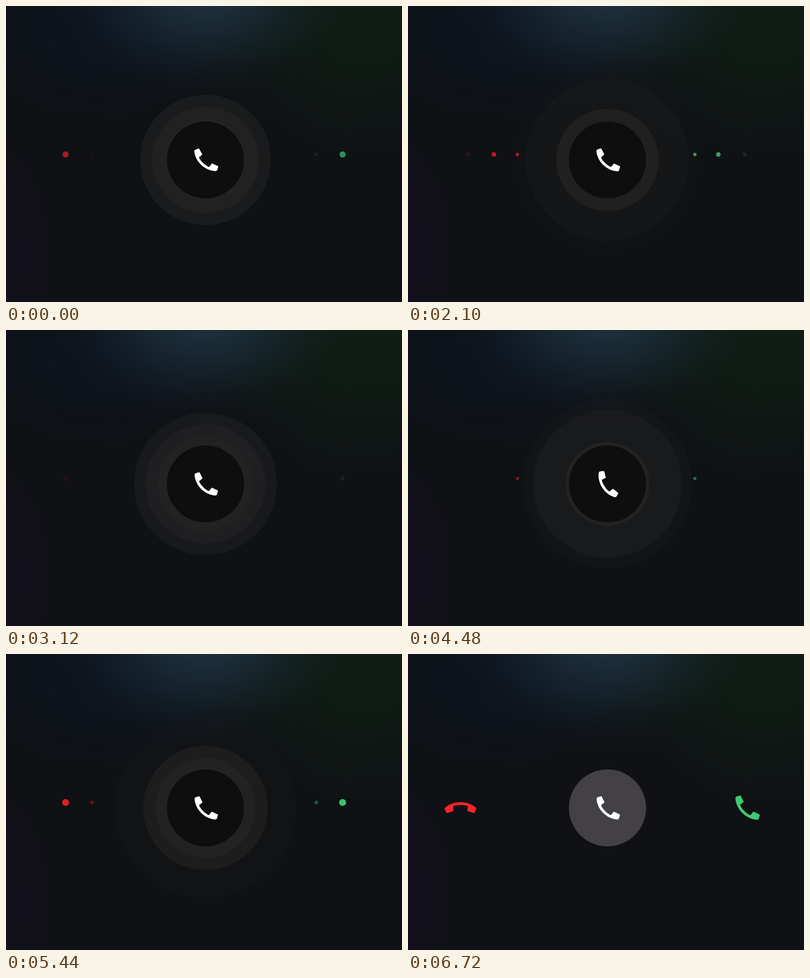
Write an HTML page with a canvas that moves like this. It is 800 px wide and 600 px high and loops after 8000 ms.

```html
<!DOCTYPE html>
<html lang="en">
<head>
<meta charset="utf-8">
<title>Incoming call</title>
<style>
  html, body { margin: 0; width: 100%; height: 100%; overflow: hidden; background: #0f1114; }
  canvas { display: block; width: 800px; height: 600px; }
</style>
</head>
<body>
<canvas id="stage" width="800" height="600"></canvas>
<script>
const ctx = document.getElementById('stage').getContext('2d');
const LOOP = 8000, CYCLE = 2800, PRESS = 6400;
const CX = 403, CY = 312, R = 78;
const RED = '246,36,40', GREEN = '64,200,112';

// handset lying flat, ends pointing down
const handset = new Path2D(
  'M-29-3.5C-13-17 13-17 29-3.5Q31.4-1.4 30.3 1L27.2 6.8Q26.6 8 25.4 7.6' +
  'L13.2 3.4L14.2-5.6C8-9-8-9-14.2-5.6L-13.2 3.4L-25.4 7.6Q-26.6 8-27.2 6.8' +
  'L-30.3 1Q-31.4-1.4-29-3.5Z');

// x, y, rx, ry, colour, alpha
const glows = [
  [180, 50, 330, 230, '12,21,36', .6],
  [730, 20, 380, 340, '16,34,20', .7],
  [400, -50, 310, 250, '31,54,68', .9],
  [-40, 500, 180, 330, '24,14,38', .55]
];

// distance from the middle, radius, start, peak, end
const dots = [
  [179.3, 4, 1400, 1930, 2480],
  [226.7, 5.3, 1690, 2240, 2900],
  [279.8, 7.3, 2000, 2600, 3200]
];

// time, degrees
const shake = [[1400, 0], [1680, 12], [1960, -13], [2240, 10], [2520, -8],
               [2640, 0], [2800, -2.2], [3060, 0]];

const clamp = v => Math.max(0, Math.min(1, v));
const smooth = v => v * v * (3 - 2 * v);

function disc(x, y, r, fill) {
  ctx.fillStyle = fill;
  ctx.beginPath();
  ctx.arc(x, y, r, 0, Math.PI * 2);
  ctx.fill();
}

function phone(x, y, deg, scale, rgb, alpha) {
  ctx.save();
  ctx.translate(x, y);
  ctx.rotate(deg * Math.PI / 180);
  ctx.scale(scale, scale);
  ctx.fillStyle = `rgba(${rgb},${alpha})`;
  ctx.fill(handset);
  ctx.restore();
}

function backdrop() {
  ctx.fillStyle = '#0f1114';
  ctx.fillRect(0, 0, 800, 600);
  for (const [x, y, rx, ry, rgb, a] of glows) {
    const g = ctx.createRadialGradient(0, 0, 0, 0, 0, 1);
    for (let i = 0; i <= 8; i++) {
      g.addColorStop(i / 8, `rgba(${rgb},${a * (1 - smooth(i / 8))})`);
    }
    ctx.save();
    ctx.translate(x, y);
    ctx.scale(rx, ry);
    disc(0, 0, 1, g);
    ctx.restore();
  }
}

function ripples(t, fade) {
  const life = 2950;
  for (let i = 0; i < 3; i++) {
    const age = (t - 1550 - i * 600 + 3 * CYCLE) % CYCLE;
    for (let u = age; u < life; u += CYCLE) {
      const r = 79 + .0459 * u - 2.79e-6 * u * u;
      disc(CX, CY, r, `rgba(35,35,36,${(1 - u / life) * fade})`);
    }
  }
}

function drawDots(t) {
  for (const [dx, size, start, peak, end] of dots) {
    const u = (t - start + 2 * CYCLE) % CYCLE + start;
    const v = clamp(u < peak ? (u - start) / (peak - start) : (end - u) / (end - peak));
    if (!v) continue;
    const a = (v + smooth(v)) / 2, r = size * (.55 + .45 * v);
    disc(400.2 - dx, 301, r, `rgba(232,32,36,${a})`);
    disc(400.2 + dx, 301, r, `rgba(${GREEN},${a})`);
  }
}

function tilt(t) {
  const u = (t - 1400 + CYCLE) % CYCLE + 1400;
  for (let i = 1; i < shake.length; i++) {
    const [t0, a] = shake[i - 1], [t1, b] = shake[i];
    if (u < t1) return a + (b - a) * smooth((u - t0) / (t1 - t0));
  }
  return 0;
}

function draw(t) {
  const press = smooth(clamp((t - PRESS) / 320));
  backdrop();
  if (press < 1) ripples(t, 1 - press);
  if (t < PRESS) drawDots(t);
  const mix = (a, b) => Math.round(a + (b - a) * press);
  disc(CX, CY, R, `rgb(${mix(14, 67)},${mix(14, 65)},${mix(15, 69)})`);
  phone(404, 312.5, -135 + (t < PRESS ? tilt(t) : 0), 1, '255,255,255', 1);
  if (press) {
    phone(106, 314.5, 0, 1.045, RED, press);
    phone(685.5, 312, -135, 1.045, GREEN, press);
  }
}

const begin = performance.now();
function tick() {
  draw((performance.now() - begin) % LOOP);
  requestAnimationFrame(tick);
}
tick();
</script>
</body>
</html>
```
